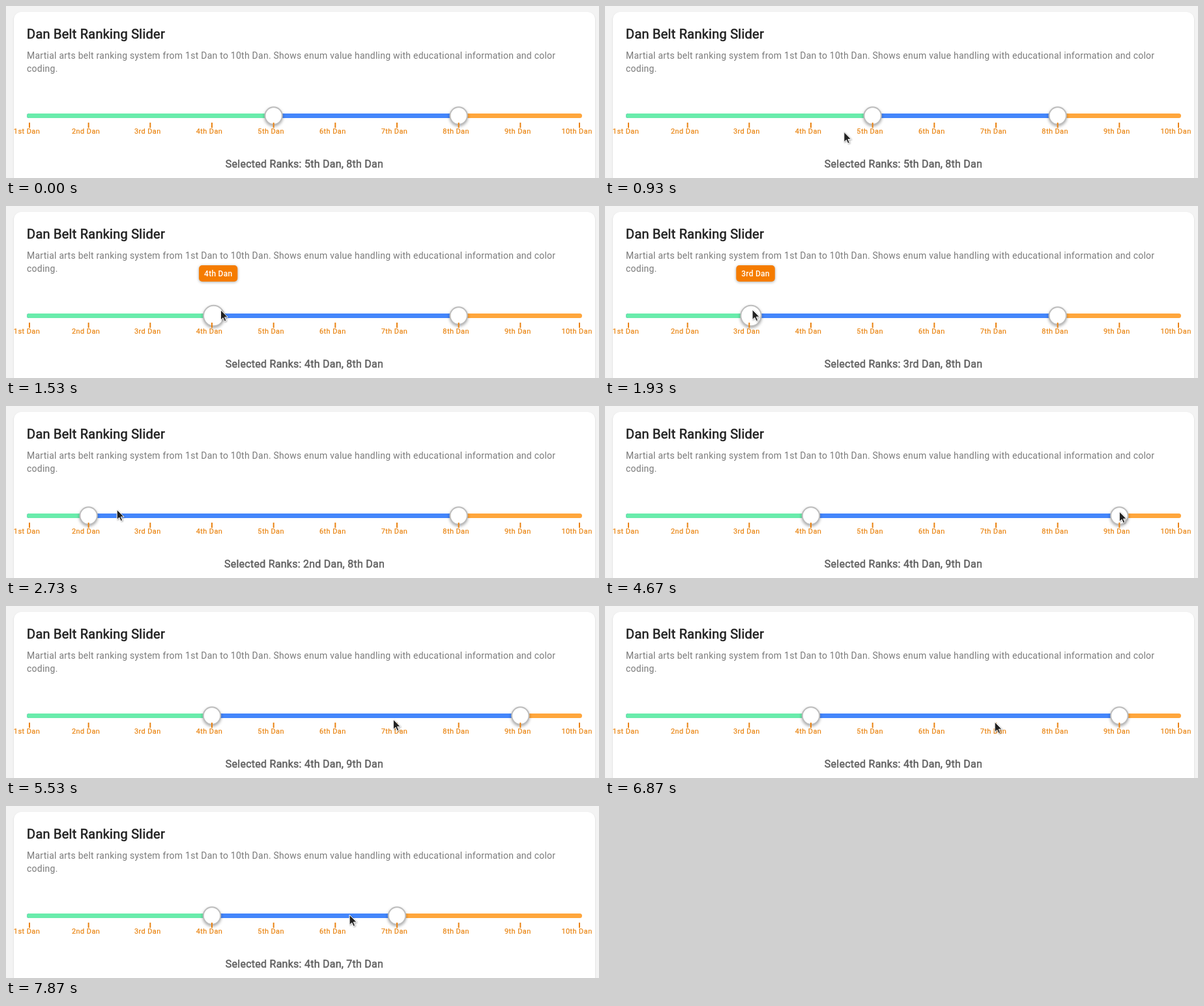
Animation, 910 px wide and 264 px high, one loop 8 s. Source, as an HTML page:

```html
<!DOCTYPE html>
<html lang="en">
<head>
<meta charset="utf-8">
<title>Dan Belt Ranking Slider</title>
<style>
  html, body { margin: 0; width: 100%; height: 100%; overflow: hidden; background: #f3f3f3; }
  svg { display: block; width: 910px; height: 264px; font-family: Roboto, sans-serif; letter-spacing: .25px; }
  .card { fill: #fff; filter: drop-shadow(0 1px 1px #0002); }
  .title { font-size: 20px; fill: #212121; stroke: #212121; stroke-width: .6; }
  .info { font-size: 14px; fill: #7b7b7b; }
  .label { font-size: 11px; letter-spacing: .4px; fill: #e9820d; stroke: #e9820d; stroke-width: .2; text-anchor: middle; }
  .tick { stroke: #ea8312; stroke-width: 2; }
  .summary { font-size: 16px; fill: #616161; stroke: #616161; stroke-width: .5; text-anchor: middle; }
  .thumb { fill: #fff; stroke: #bdbdbd; stroke-width: 2; filter: drop-shadow(0 2px 2px #0005); }
  #tip { filter: drop-shadow(0 1px 2px #0005); }
  #tip rect { fill: #f57c00; }
  #tip text { font-size: 12px; font-weight: 500; fill: #fff; text-anchor: middle; }
  #cursor { fill: #222; stroke: #fff; filter: drop-shadow(1px 1px 1px #0005); }
</style>
</head>
<body>
<svg viewBox="0 0 910 264">
  <rect class="card" x="12" y="9" width="892" height="300" rx="12"/>
  <text class="title" x="32" y="50">Dan Belt Ranking Slider</text>
  <text class="info" x="32" y="81">Martial arts belt ranking system from 1st Dan to 10th Dan. Shows enum value handling with educational information and color</text>
  <text class="info" x="32" y="101">coding.</text>

  <clipPath id="groove"><rect x="32" y="165" width="852" height="7" rx="3.5"/></clipPath>
  <g clip-path="url(#groove)">
    <rect x="32" y="164" width="852" height="9" fill="#ffa63c"/>
    <rect id="blue" x="32" y="164" height="9" fill="#4486fb"/>
    <rect id="green" x="32" y="164" height="9" fill="#69ecab"/>
  </g>
  <circle id="low" class="thumb" cy="168.5"/>
  <circle id="high" class="thumb" cy="168.5" r="13.2"/>
  <g id="scale"></g>
  <text id="summary" class="summary" x="458" y="248"></text>
  <g id="tip"><rect y="91" height="25" rx="5"/><text y="108"></text></g>
  <path id="cursor" d="M0 0V15.5L3.6 12.2L6 17.6L8.6 16.5L6.2 11.2H11Z"/>
</svg>
<script>
const LOOP = 8000, STEP = 200 / 3, RANKS = 10;
const $ = id => document.getElementById(id);
const set = (node, attributes) => {
  for (const name in attributes) node.setAttribute(name, attributes[name]);
};
const rankX = rank => 32 + (rank - 1) * 852 / (RANKS - 1);
const rankName = rank => rank + (['st', 'nd', 'rd'][rank - 1] || 'th') + ' Dan';

// Pointer moves; the horizontal goal is a place on the rank scale.
const entry = { rank: 3.43, y: 273 };
const moves = [
  { from: 600, to: 1330, rank: 5, y: 160 },
  { from: 1400, to: 1930, rank: 3.05, y: 159 },
  { from: 2000, to: 2400, rank: 2.46, y: 159 },
  { from: 2800, to: 3670, rank: 4, y: 168 },
  { from: 3870, to: 4470, rank: 9, y: 162 },
  { from: 4870, to: 5300, rank: 6.6, y: 174 },
  { from: 5300, to: 5530, rank: 6.94, y: 174 },
  { from: 6330, to: 6870, rank: 6.98, y: 178 },
  { from: 7200, to: 7870, rank: 6.23, y: 167 }
];
const PRESS = 1465, RELEASE = 2730, LOW_CLICK = 3660, HIGH_CLICKS = [4660, 7130];

function pointerAt(t) {
  let { rank, y } = entry;
  for (const move of moves) {
    const u = Math.min(1, Math.max(0, (t - move.from) / (move.to - move.from)));
    const eased = 1 - (1 - u) ** 2;
    rank += (move.rank - rank) * eased;
    y += (move.y - y) * eased;
  }
  return { rank, y };
}

function lowRank(t) {
  if (t < PRESS) return 5;
  if (t >= LOW_CLICK) return 4;
  return Math.round(pointerAt(Math.min(t, RELEASE)).rank);
}
const highRank = t => t < HIGH_CLICKS[0] ? 8 : t < HIGH_CLICKS[1] ? 9 : 7;

for (let rank = 1; rank <= RANKS; rank++) {
  const x = Math.min(880, Math.max(36, rankX(rank)));
  $('scale').innerHTML += `<path class="tick" d="M${x} 179v8"/>
    <text class="label" x="${x - 4}" y="196">${rankName(rank)}</text>`;
}

const [tipBox, tipText] = $('tip').children;

function draw(t) {
  const low = lowRank(t), high = highRank(t);
  const lowX = rankX(low), highX = rankX(high);
  const dragging = t >= PRESS && t < RELEASE;

  set($('green'), { width: lowX - 32 });
  set($('blue'), { width: highX - 32 });
  set($('low'), dragging ? { cx: lowX + 2.7, r: 15.7 } : { cx: lowX, r: 13.2 });
  set($('high'), { cx: highX });
  $('summary').textContent = `Selected Ranks: ${rankName(low)}, ${rankName(high)}`;

  $('tip').style.visibility = dragging ? 'visible' : 'hidden';
  tipText.textContent = rankName(low);
  const width = tipText.getComputedTextLength() + 16, tipX = lowX + 9.7;
  set(tipText, { x: tipX });
  set(tipBox, { x: tipX - width / 2, width });

  const { rank, y } = pointerAt(t);
  $('cursor').style.visibility = t < moves[0].from ? 'hidden' : 'visible';
  set($('cursor'), { transform: `translate(${rankX(rank)} ${y})` });
}

// The picture advances at 15 steps per second.
function tick() {
  const t = performance.now() % LOOP;
  draw(Math.floor((t + 4) / STEP) * STEP);
  requestAnimationFrame(tick);
}
tick();
</script>
</body>
</html>
```
